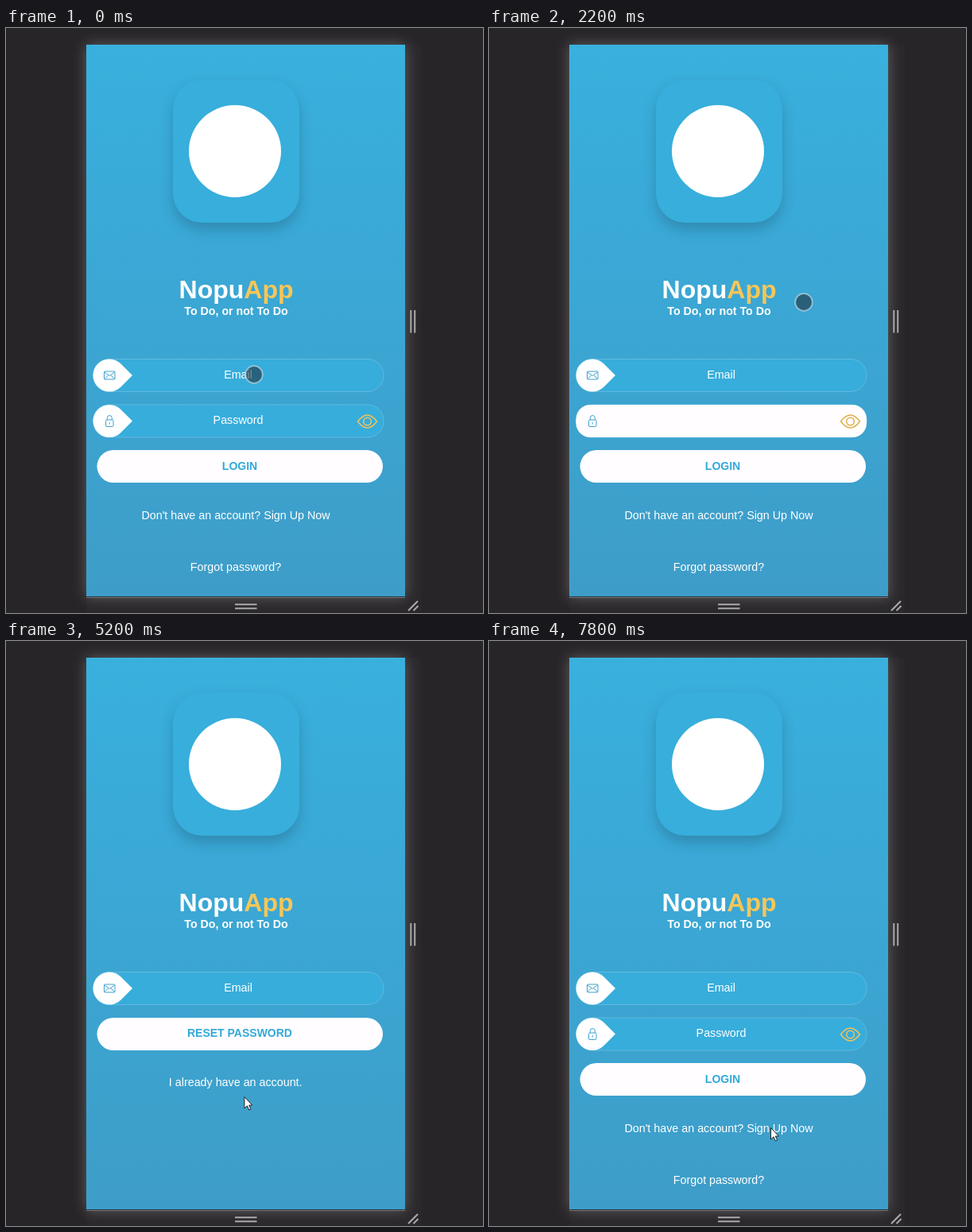
Recreate the animation shown at these times as an HTML page. Size 600 by 736 pixels, loop 8 s.

```html
<!DOCTYPE html>
<html lang="en">
<head>
<meta charset="utf-8">
<title>Login screen</title>
<style>
  html, body { margin: 0; width: 100%; height: 100%; overflow: hidden; background: #272528; }
  svg { display: block; width: 600px; height: 736px; }
  text { font: 14.3px "Liberation Sans", Arial, sans-serif; fill: #fff; text-anchor: middle; }
  .bold { font-weight: bold; font-size: 14px; }
  .title { font-size: 32px; font-weight: bold; }
  .action { fill: #33a9d8; }
  .icon { fill: none; stroke: #3c9fcd; stroke-width: 1; stroke-linejoin: round; }
  .button { fill: #fffdff; }
  .box { fill: #37addb; stroke: #60badf; stroke-width: 1; }
</style>
</head>
<body>
<svg viewBox="0 0 600 736">
  <defs>
    <linearGradient id="sky" x2="0" y2="1">
      <stop stop-color="#39b0dd"/>
      <stop offset=".3" stop-color="#3aaad8"/>
      <stop offset="1" stop-color="#3e9dc8"/>
    </linearGradient>
    <filter id="glow" x="-20%" y="-20%" width="140%" height="140%"><feGaussianBlur stdDeviation="9"/></filter>
    <filter id="shade" x="-30%" y="-30%" width="160%" height="160%"><feGaussianBlur stdDeviation="9"/></filter>
    <!-- Input shell, drawn around its vertical centre -->
    <g id="shell">
      <rect class="box" x="109.5" y="-20.5" width="365.5" height="41" rx="20"/>
      <path fill="#fff" d="M159 0 L144.5 -14.5 A20.5 20.5 0 1 0 144.5 14.5 Z"/>
    </g>
    <rect id="pill" class="button" x="114.5" y="-20.5" width="359.5" height="41" rx="20.5"/>
  </defs>

  <rect width="600" height="736" fill="#272528"/>
  <rect x="101" y="21" width="422" height="715" fill="#2a282b"/>
  <rect x="101" y="21" width="401" height="695" fill="#fff" opacity=".27" filter="url(#glow)"/>
  <rect x="101" y="21" width="401" height="694" fill="url(#sky)"/>
  <path d="M101 715.5H502" stroke="#27343b"/>
  <path d="M101 716.5H502" stroke="#77757a"/>
  <path d="M509.3 355V383.5M514.2 355V383.5M288 725.2H315.5M288 730.2H315.5M506 733L518 721M512.5 733L518.5 727"
        stroke="#aaa9ab" stroke-width="2"/>

  <rect x="211" y="74" width="157" height="179" rx="36" fill="#123" opacity=".25" filter="url(#shade)"/>
  <rect x="210" y="65" width="159" height="180" rx="37" fill="#37aedb"/>
  <circle cx="288" cy="155" r="58" fill="#fff"/>

  <text class="title" x="289.5" y="340">Nopu<tspan fill="#f6c659">App</tspan></text>
  <text class="bold" x="289.5" y="361" style="font-size:14.2px">To Do, or not To Do</text>

  <g id="email">
    <use href="#shell" y="437"/>
    <rect class="fill" x="109.5" y="416.5" height="41" rx="18" fill="#fdfdfe"/>
    <g class="icon">
      <rect x="123.5" y="432" width="13.5" height="10" rx="1"/>
      <path d="M124 433L130.2 437.5L136.5 433M124 441.5L128.5 437M136.5 441.5L132 437"/>
    </g>
    <text x="292" y="441">Email</text>
  </g>

  <g id="login">
    <g id="password">
      <use href="#shell" y="494.5"/>
      <rect class="fill" x="109.5" y="474" height="41" rx="18" fill="#fffdff"/>
      <g class="icon">
        <rect x="125.5" y="493" width="9.5" height="8.5" rx="1.5"/>
        <path d="M127.3 493V490.5A3 3 0 0 1 133.3 490.5V493M130.2 496V498.5"/>
      </g>
      <g id="eye" fill="none" stroke-width="1.5">
        <path d="M442.5 495Q454.5 479 466.5 495Q454.5 511 442.5 495Z"/>
        <circle cx="454.5" cy="495" r="4.8"/>
      </g>
      <text x="292" y="498">Password</text>
    </g>
    <use href="#pill" y="551.5"/>
    <text class="bold action" x="294" y="556">LOGIN</text>
    <text x="289" y="618">Don't have an account? Sign Up Now</text>
    <text x="289" y="682.5">Forgot password?</text>
  </g>

  <g id="reset">
    <use href="#pill" y="494.5"/>
    <text class="bold action" x="294" y="498">RESET PASSWORD</text>
    <text x="288.7" y="560">I already have an account.</text>
  </g>

  <g id="pointer">
    <circle id="touch" r="10.8" fill="#1a1c26" fill-opacity=".52" stroke="#d5e4ee" stroke-opacity=".62" stroke-width="1.8"/>
    <path id="arrow" d="M.5 .5V15L4 11.8L6.3 17L8.6 16L6.3 11H10.5Z" fill="#fff" stroke="#222" stroke-width="1"/>
  </g>
</svg>
<script>
const LOOP = 8000, STEP = 200, TRANSITION = 400;
const $ = id => document.getElementById(id);
const clamp = v => Math.min(1, Math.max(0, v));
const ease = v => v * v * (3 - 2 * v);
const show = (node, on) => { node.style.display = on ? '' : 'none'; };

// time, x, y
const route = [
  [0, 312, 436], [800, 312, 436], [1200, 318, 494], [1600, 318, 494],
  [2200, 396, 345], [2400, 396, 345], [3200, 332, 644], [3600, 300, 673],
  [3800, 300, 673], [4400, 314, 629], [4800, 300, 573], [6200, 297, 573],
  [6600, 294, 555], [6800, 294, 555], [7800, 354, 612]
];

function pointerAt(t) {
  const next = Math.max(1, route.findIndex(p => p[0] >= t));
  const [t0, x0, y0] = route[next - 1], [t1, x1, y1] = route[next];
  const k = ease(clamp((t - t0) / (t1 - t0)));
  return [x0 + (x1 - x0) * k, y0 + (y1 - y0) * k];
}

function drawField(id, t, focus, blur) {
  const node = $(id), fill = node.querySelector('.fill'), label = node.querySelector('text');
  const k = ease(clamp((t - focus) / TRANSITION)) - ease(clamp((t - blur) / TRANSITION));
  fill.setAttribute('width', 41 + 324.5 * k);
  show(fill, k > 0);
  const mix = (a, b) => Math.round(a + (b - a) * k);
  label.style.fill = `rgb(${mix(255, 58)},${mix(255, 160)},${mix(255, 205)})`;
  show(label, t <= focus + TRANSITION || t >= blur);
  return k;
}

function draw(t) {
  drawField('email', t, 200, 1400);
  const focused = drawField('password', t, 1400, 2400);
  $('eye').setAttribute('stroke', focused > .9 ? '#dfb04a' : '#f0c35a');

  const resetting = t >= 4000 && t < 6800;
  show($('login'), !resetting);
  show($('reset'), resetting);

  $('pointer').setAttribute('transform', `translate(${pointerAt(t)})`);
  show($('touch'), t < 2600);
  show($('arrow'), t >= 2600);
}

function tick() {
  draw(Math.floor(performance.now() % LOOP / STEP) * STEP);
  requestAnimationFrame(tick);
}
tick();
</script>
</body>
</html>
```
